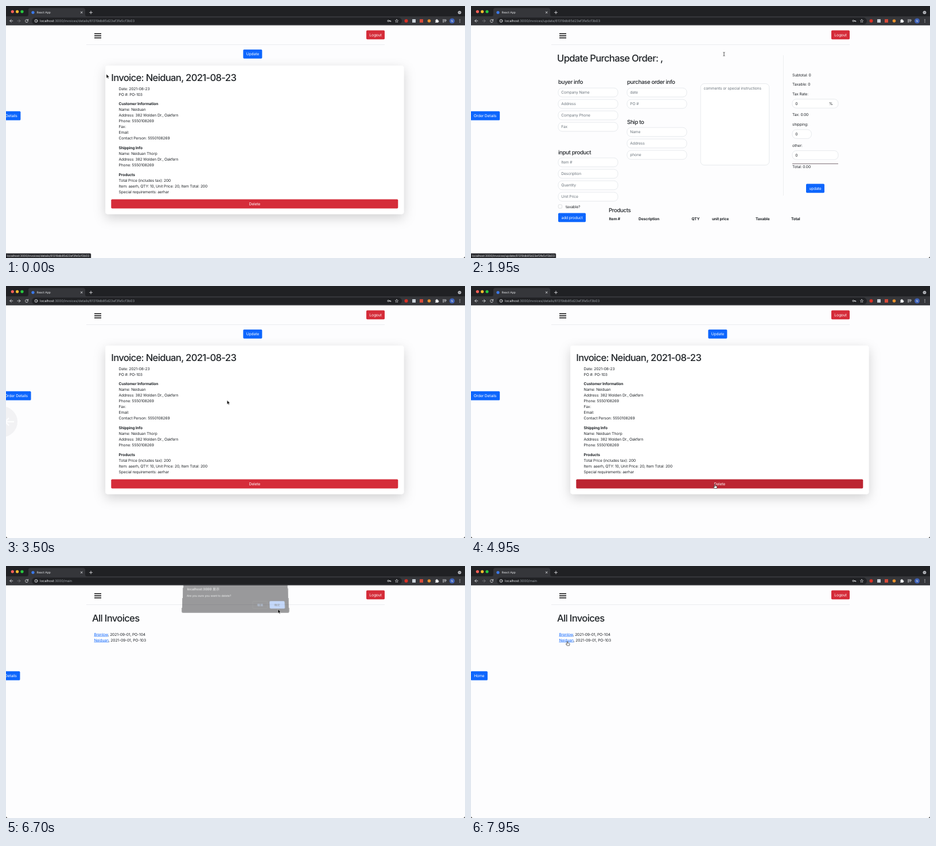
Recreate the animation shown at these times as an HTML page. Size 800 by 440 pixels, loop 8 s.

```html
<!DOCTYPE html>
<html lang="en">
<head>
<meta charset="utf-8">
<title>Invoices</title>
<style>
html, body { margin: 0; width: 100%; height: 100%; overflow: hidden; background: #fdfdfe; }
#stage { position: relative; width: 800px; height: 440px; overflow: hidden; }
svg { position: absolute; left: 0; top: 0; overflow: visible; }
text { font: 6.67px Inter, "Noto Sans CJK SC", sans-serif; letter-spacing: -.017em; fill: #212529; text-rendering: geometricPrecision; white-space: pre; }
.mid { text-anchor: middle; }
.white { fill: #fff; }
.bold { font-weight: 700; letter-spacing: -.02em; }
.h1 { font-size: 16.67px; font-weight: 500; letter-spacing: -.042em; }
.h4 { font-size: 9.75px; font-weight: 500; letter-spacing: -.042em; }
.hint { fill: #6c757d; }
.link { fill: #0d66fd; text-decoration: underline; }
.small { font-size: 5px; letter-spacing: 0; fill: #e8eaed; }
.url { font-size: 5.83px; letter-spacing: -.005em; fill: #9aa0a6; }
.field { fill: #fff; stroke: #ced4da; stroke-width: .5; }
.icon { fill: none; stroke: #e3e5e8; stroke-width: .85; stroke-linecap: round; stroke-linejoin: round; }

/* Page switches: 1300, 3050 and 6600 ms of the 8000 ms loop */
.details, .update, .main, .forward, .shape { animation: 8s step-end infinite; }
.details { animation-name: details; }
.update { animation-name: update; }
.main { animation-name: main; }
.forward { animation-name: forward; }
@keyframes details { 0% { visibility: visible } 16.25% { visibility: hidden } 38.125% { visibility: visible } 82.5%, 100% { visibility: hidden } }
@keyframes update { 0% { visibility: hidden } 16.25% { visibility: visible } 38.125%, 100% { visibility: hidden } }
@keyframes main { 0% { visibility: hidden } 82.5%, 100% { visibility: visible } }
@keyframes forward { 0% { opacity: .4 } 38.125% { opacity: 1 } 82.5%, 100% { opacity: .4 } }

.order { animation: order 8s cubic-bezier(.2, .65, .4, 1) infinite; }
@keyframes order {
  0% { transform: translateX(-25px) }
  5%, 16.25% { transform: none; animation-timing-function: linear }
  18.75% { transform: translateX(-51px) }
  24%, 38.125% { transform: none; animation-timing-function: linear }
  40.625% { transform: translateX(-51px); animation-timing-function: cubic-bezier(.33, .8, .6, 1) }
  46.25%, 82.5% { transform: none; animation-timing-function: linear }
  85%, 100% { transform: translateX(-51px) }
}
.home { animation: home 8s cubic-bezier(.2, .65, .4, 1) infinite; }
@keyframes home { 0%, 85% { transform: translateX(-30px) } 96%, 100% { transform: none } }

.delete { animation: delete 8s linear infinite; }
@keyframes delete {
  0%, 8.75% { fill: #d52c39 }
  10.6%, 11.8% { fill: #bc2532 }
  13.5%, 53.75% { fill: #d52c39 }
  55.6%, 64.5% { fill: #bc2532 }
  65.5%, 100% { fill: #ab202d }
}
.ring { animation: ring 8s linear infinite; }
@keyframes ring { 0%, 64.5% { opacity: 0 } 66%, 100% { opacity: 1 } }

.status-details { animation: status-details 8s linear infinite; }
.status-update { animation: status-update 8s linear infinite; }
@keyframes status-details { 0%, 3.5% { opacity: 1 } 6%, 100% { opacity: 0 } }
@keyframes status-update { 0%, 14.5% { opacity: 0 } 15.5%, 28.5% { opacity: 1 } 30.5%, 100% { opacity: 0 } }

.swipe { animation: swipe 8s linear infinite; }
@keyframes swipe {
  0%, 33.75% { transform: translateX(-25px); opacity: 0 }
  37.5%, 41.25% { transform: translateX(10px); opacity: 1 }
  43.75% { transform: none; opacity: .3 }
  46.25%, 100% { transform: translateX(-8px); opacity: 0 }
}

#sheet { position: absolute; left: 290px; top: 33px; width: 220px; height: 80px; overflow: hidden; }
#dialog { left: 16px; animation: dialog 8s linear infinite; transform-origin: 50% 100%; }
@keyframes dialog {
  0%, 65.625% { opacity: 0; transform: perspective(290px) translateY(-10px) rotateX(20deg) }
  67.8%, 82.5% { opacity: 1; transform: perspective(290px) translateY(0) rotateX(0deg) }
  83.75% { opacity: .46; transform: perspective(290px) translateY(-5.3px) rotateX(10deg) }
  85%, 100% { opacity: 0; transform: perspective(290px) translateY(-10px) rotateX(20deg) }
}

.cursor { animation: cursor 8s ease-in-out infinite; }
@keyframes cursor {
  0%, 2% { transform: translate(175px, 119px) }
  8.75% { transform: translate(425px, 340px) }
  10.6% { transform: translate(427px, 346px); animation-timing-function: ease-in }
  11.875% { transform: translate(421px, 259.3px); animation-timing-function: ease-out }
  14.6%, 17% { transform: translate(431px, 84px) }
  22%, 26% { transform: translate(441px, 84px) }
  33%, 43.75% { transform: translate(385.3px, 199.5px) }
  50% { transform: translate(402px, 322px) }
  55%, 67% { transform: translate(425px, 346px) }
  74.375% { transform: translate(458.6px, 96px) }
  78%, 82% { transform: translate(473px, 73px) }
  83.75%, 86% { transform: translate(474px, 75.5px) }
  95% { transform: translate(171px, 130px) }
  99.375%, 100% { transform: translate(168px, 131.5px) }
}
.arrow { animation-name: arrow; }
.hand { animation-name: hand; }
.beam { animation-name: beam; }
@keyframes arrow {
  0%, 11.25%, 16.25%, 26.875%, 65.625% { visibility: visible }
  8.75%, 14.375%, 23.125%, 53.75%, 93.75%, 100% { visibility: hidden }
}
@keyframes hand {
  0%, 11.25%, 16.25%, 65.625% { visibility: hidden }
  8.75%, 14.375%, 53.75%, 93.75%, 100% { visibility: visible }
}
@keyframes beam { 0%, 26.875%, 100% { visibility: hidden } 23.125% { visibility: visible } }
</style>
</head>
<body>
<div id="stage">
  <svg id="screen" width="800" height="440"></svg>
  <div id="sheet"><svg id="dialog" width="188" height="54"></svg></div>
  <svg width="800" height="440">
    <g class="cursor" stroke-linejoin="round">
      <path class="shape arrow" d="M0 0V7.1L1.7 5.6L2.8 8.1L4 7.6L2.9 5.1H5.1Z" fill="#000" stroke="#fff" stroke-width=".5"/>
      <path class="shape hand" d="M-.7 .6Q0 -.4 .7 .6V3L3.5 3.6Q4.2 3.9 4 5L3.4 7.4H-.8L-2.7 4.7Q-2.6 3.7 -.7 5Z" fill="#fff" stroke="#111" stroke-width=".65"/>
      <path class="shape beam" d="M-1.5 -3.2Q0 -3.2 0 -2.4Q0 -3.2 1.5 -3.2M0 -2.4V2.4M-1.5 3.2Q0 3.2 0 2.4Q0 3.2 1.5 3.2" fill="none" stroke="#222" stroke-width=".75"/>
    </g>
  </svg>
</div>
<script>
const BLUE = '#0d66fd', RED = '#d52c39', ID = '61319db85d23ef3fe5cf3b03';

// Text is placed by the vertical middle of its capitals.
const text = (x, y, s, cls = '', drop = 2.4) => `<text x="${x}" y="${y + drop}" class="${cls}">${s}</text>`;
const h1 = (x, y, s) => text(x, y, s, 'h1', 6);
const h4 = (x, y, s) => text(x, y, s, 'h4', 3.4);
const rect = (x, y, w, h, r, attrs) => `<rect x="${x}" y="${y}" width="${w}" height="${h}" rx="${r}" ${attrs}/>`;
const dot = (x, y, r, fill) => `<circle cx="${x}" cy="${y}" r="${r}" fill="${fill}"/>`;
const icon = (d, attrs = '') => `<path class="icon" d="${d}" ${attrs}/>`;
const button = (x, y, w, label, attrs) =>
  rect(x, y, w, 15.8, 1.7, attrs) + text(x + w / 2, y + 7.9, label, 'mid white');
const field = (x, y, w, label, cls = 'hint') =>
  rect(x, y - 7.8, w, 15.6, 6.8, 'class="field"') + text(x + 5.3, y, label, cls);
const fields = (x, y, labels) => labels.map((s, i) => field(x, y + 20 * i, 104, s)).join('');
const lines = (x, y, list) => list.map((s, i) => text(x, y + 10 * i, s)).join('');
const url = path => text(59, 26, `<tspan fill="#e8eaed">localhost</tspan>:3000/${path}`, 'url', 2);
const status = (cls, path) => `<g class="${cls}">` +
  rect(-2, 432, 150, 10, 1.5, 'fill="#2b2c30" stroke="#4a4b50" stroke-width=".4"') +
  text(2, 436.1, `localhost:3000/${path}`, 'small', 1.9) + '</g>';

const browser = () => [
  rect(0, 0, 800, 33.5, 0, 'fill="#202124"'),
  rect(0, 18, 800, 15.5, 0, 'fill="#35363a"'),
  '<path d="M36 18Q39 18 39 15V7Q39 3.5 42.5 3.5H134.500Q138 3.500 138 7V15Q138 18 141 18Z" fill="#35363a"/>',
  dot(11.3, 9.8, 2.6, '#ff5f57'), dot(19.6, 9.8, 2.6, '#febc2e'), dot(28, 9.8, 2.6, '#28c840'),
  dot(47, 11.3, 2.6, '#3b78e7'),
  text(53.5, 11.3, 'React App', 'small', 1.85),
  icon('M130.300 9.800L133 12.700M133 9.800L130.300 12.700'),
  icon('M145.500 11.300H150.500M148 8.800V13.800'),
  dot(790.5, 11.3, 2.9, '#b9bbc0'),
  '<path d="M789.200 10.800L790.500 12.100L791.800 10.800" fill="none" stroke="#202124" stroke-width=".7"/>',
  icon('M11.800 26H6.800M9.200 23.600L6.800 26L9.200 28.400'),
  `<g class="forward">${icon('M20 26H25M22.600 23.600L25 26L22.600 28.400')}</g>`,
  icon('M38.200 24.800A2.500 2.500 0 1 0 38.500 26.600M38.500 23.300V25.100H36.700'),
  rect(45, 20.2, 645, 11.7, 5.85, 'fill="#202124"'),
  '<circle class="icon" cx="52.500" cy="26" r="2.500" stroke-width=".6"/>',
  icon('M52.500 25.900V27.200M52.500 24.700V24.800', 'style="stroke-width:.6"'),
  icon('M667.800 26H670.800V27.200M669.500 26V27'),
  '<circle class="icon" cx="666.400" cy="26" r="1.400"/>',
  icon('M681 23.300L681.800 25.100L683.700 25.300L682.300 26.600L682.700 28.500L681 27.500L679.300 28.500L679.700 26.600L678.300 25.300L680.200 25.100Z', 'style="stroke-width:.6"'),
  dot(697.5, 26, 3, '#d93025'),
  rect(708, 23, 6, 6, .5, 'fill="#c9d0d6"'),
  rect(721, 23, 6, 6, .5, 'fill="#d64a3a"'),
  dot(737.5, 26, 2.8, '#e8912d'),
  '<path d="M748.300 24.200H749.700A1.200 1.200 0 0 1 752.100 24.200H753.300V25.600A1.200 1.200 0 0 1 753.300 28V29H748.300V27.500A1.100 1.100 0 0 0 748.300 25.500Z" fill="#eceef0"/>',
  icon('M761.300 24H766.500M761.300 26H764.500M761.300 28H763.500M766 27.800V25H767.500'),
  dot(777.5, 26, 4.6, '#3f62b8'),
  text(777.5, 26, 'N', 'small mid', 1.8),
  [23.7, 26, 28.3].map(y => dot(791, y, .65, '#e3e5e8')).join('')
].join('');

const header = () => [48.4, 52, 55.6].map(y => rect(154, y - .8, 12, 1.6, 0, 'fill="#111"')).join('') +
  button(628, 42.5, 32, 'Logout', `fill="${RED}"`) +
  rect(140, 67.2, 520, .5, 0, 'fill="#d9dbde"');

const detailsPage = () => [
  url(`invoices/details/${ID}`),
  button(413.4, 76, 33, 'Update', `fill="${BLUE}"`),
  rect(173.3, 104, 520, 259.3, 4, 'fill="#fff" filter="url(#shadow)"'),
  h1(183.3, 124.8, 'Invoice: Neiduan, 2021-08-23'),
  lines(196.6, 144.2, ['Date: 2021-08-23', 'PO #: PO-103']),
  text(196.6, 170.9, 'Customer Information', 'bold'),
  lines(196.6, 180.9, ['Name: Neiduan', 'Address: 382 Wolden Dr., Oakfern', 'Phone: 5550108269', 'Fax:', 'Email:', 'Contact Person: 5550108269']),
  text(196.6, 247.6, 'Shipping Info', 'bold'),
  lines(196.6, 257.6, ['Name: Neiduan Thorp', 'Address: 382 Wolden Dr., Oakfern', 'Phone: 5550108269']),
  text(196.6, 294.3, 'Products', 'bold'),
  lines(196.6, 304.3, ['Total Price (includes tax): 200', 'Item: aaerh, QTY: 10, Unit Price: 20, Item Total: 200', 'Special requirements: aerhar']),
  rect(182.6, 336.9, 501.6, 17.2, 2.4, 'class="ring" fill="none" stroke="#e9969e" stroke-width="1.3"'),
  button(183.3, 337.6, 500, 'Delete', 'class="delete"')
].join('');

const columns = { 240.5: 'Item #', 292: 'Description', 384.5: 'QTY', 420: 'unit price', 496: 'Taxable', 558: 'Total' };
const updatePage = () => [
  url(`invoices/update/${ID}`),
  h1(150, 91.4, 'Update Purchase Order: ,'),
  h4(152, 133, 'buyer info'),
  fields(152, 151, ['Company Name', 'Address', 'Company Phone', 'Fax']),
  h4(152, 255.3, 'input product'),
  fields(152, 273, ['Item #', 'Description', 'Quantity', 'Unit Price']),
  rect(152.3, 346.9, 6.2, 6.2, 1.5, 'fill="#fff" stroke="#b9bcc0" stroke-width=".5"'),
  text(165, 350.3, 'taxable?'),
  button(152, 361.4, 48, 'add product', `fill="${BLUE}"`),
  h4(272, 133, 'purchase order info'),
  fields(272, 151, ['date', 'PO #']),
  h4(272, 202.3, 'Ship to'),
  fields(272, 220, ['Name', 'Address', 'phone']),
  rect(400.2, 135.6, 119.6, 142.2, 6.5, 'class="field"'),
  text(405.5, 143.5, 'comments or special instructions', 'hint'),
  h4(240, 357, 'Products'),
  Object.entries(columns).map(([x, s]) => text(x, 371.4, s, 'bold')).join(''),
  rect(544.2, 86, .5, 245, 0, 'fill="#dcdee1"'),
  text(560, 120.2, 'Subtotal: 0'), text(560, 136.9, 'Taxable: 0'), text(560, 153.5, 'Tax Rate:'),
  field(560, 170.4, 80, '0', ''), text(624, 170.4, '%'),
  text(560, 190, 'Tax: 0.00'), text(560, 206.7, 'shipping:'),
  field(560, 223.6, 33.3, '0', ''),
  text(560, 243.4, 'other:'),
  field(560, 260.4, 80, '0', ''),
  rect(560, 275, 80, .7, 0, 'fill="#4a3540"'),
  text(560, 280.6, 'Total: 0.00'),
  button(584, 310.5, 32, 'update', `fill="${BLUE}"`)
].join('');

const mainPage = () => url('main') + h1(150, 91.4, 'All Invoices') + lines(153.4, 119.2, [
  '<tspan class="link">Brenlow</tspan>, 2021-09-01, PO-104',
  '<tspan class="link">Neiduan</tspan>, 2021-09-01, PO-103'
]);

const group = (cls, body) => `<g class="${cls}">${body}</g>`;
document.getElementById('screen').innerHTML = [
  '<filter id="shadow" x="-10%" y="-20%" width="120%" height="150%"><feDropShadow dx="0" dy="6.7" stdDeviation="10" flood-opacity=".175"/></filter>',
  browser(), header(),
  group('details', detailsPage()),
  group('update', updatePage()),
  group('main', mainPage()),
  group('order', button(-1, 183.8, 51.2, 'Order Details', `fill="${BLUE}"`)),
  group('home', button(-.3, 183.8, 29.2, 'Home', `fill="${BLUE}"`)),
  group('swipe', dot(-7, 237, 27, '#d9dadd') +
    '<path d="M14 237H-1M5 230.500L-1.500 237L5 243.500" fill="none" stroke="#fff" stroke-width="2.400"/>'),
  status('status-details', `invoices/details/${ID}`),
  status('status-update', `invoices/update/${ID}`),
  '<path d="M0 436.500Q0 440 3.500 440H0ZM800 436.500Q800 440 796.500 440H800Z" fill="#000"/>'
].join('');

document.getElementById('dialog').innerHTML = [
  rect(.2, -3, 187.4, 56.8, 2.5, 'fill="#202124" stroke="#3a3b3f" stroke-width=".4"'),
  text(7.5, 10.3, 'localhost:3000 显示', 'small" style="font-size:6.1px;font-weight:500', 2.2),
  text(7.5, 22.6, 'Are you sure you want to delete?', 'small" style="font-size:5.1px', 1.9),
  rect(124.2, 33.3, 26, 13, 1.7, 'fill="none" stroke="#3c4043" stroke-width=".5"'),
  text(137.2, 39.8, '取消', 'small mid" style="font-weight:500;fill:#8ab4f8', 1.9),
  rect(154, 33, 26.6, 13.5, 1.7, 'fill="#7fabf5"'),
  text(167.3, 39.8, '确定', 'small mid" style="font-weight:500;fill:#202124', 1.9)
].join('');
</script>
</body>
</html>
```
